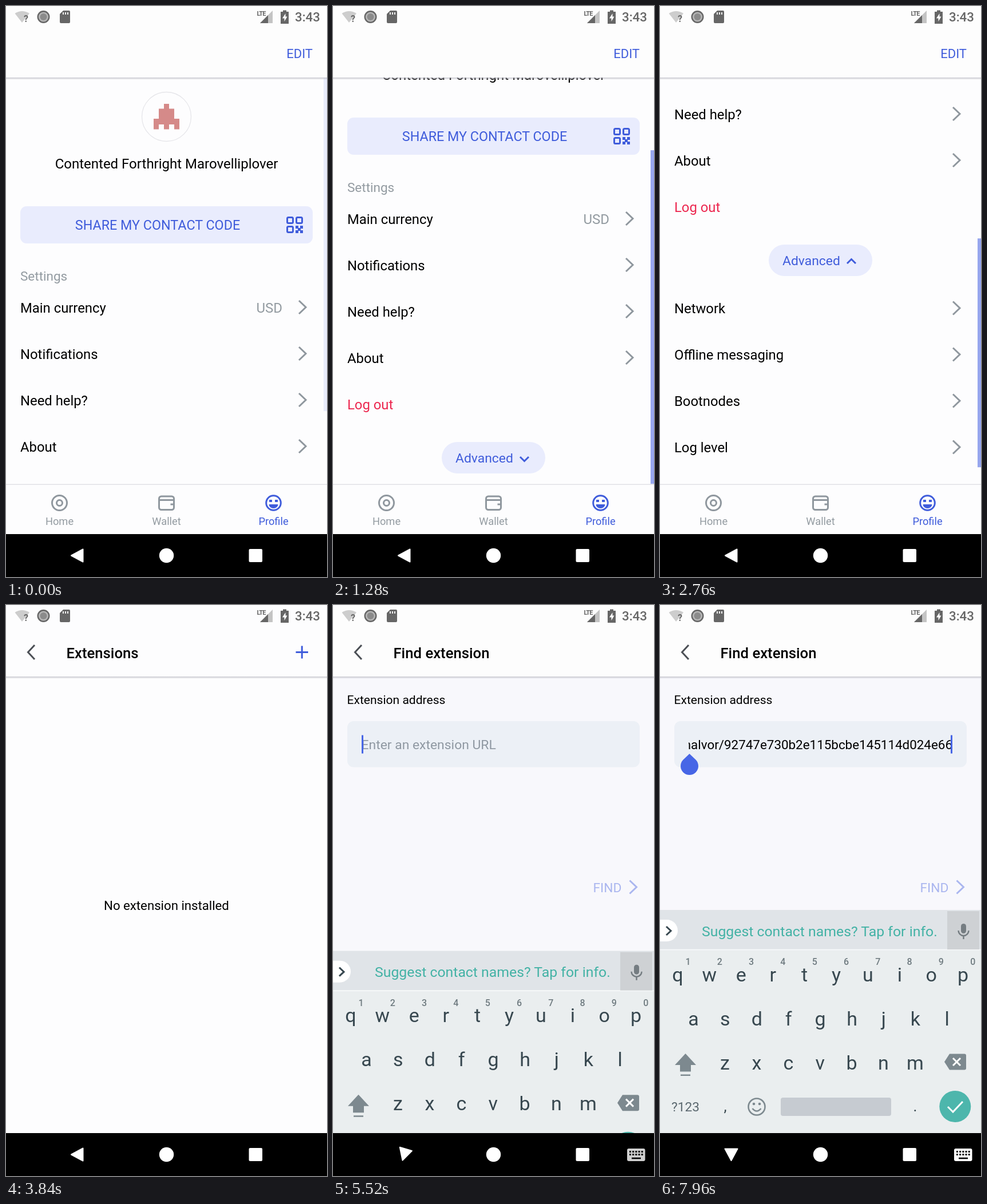
Recreate the animation shown at these times as an HTML page. Size 561 by 998 pixels, loop 8000 ms.

```html
<!DOCTYPE html>
<html lang="en">
<head>
<meta charset="utf-8">
<title>Installing an extension</title>
<style>
  html, body { margin: 0; width: 100%; height: 100%; overflow: hidden; background: #fdfdfe; }
  svg { display: block; width: 100%; height: 100%; font-family: Roboto, sans-serif; }
  .blue { fill: #3f5cdb; }
  .gray { fill: #939ba1; }
  .line { fill: none; stroke: #8f979e; stroke-width: 3; }
  .blueLine { fill: none; stroke: #3f5cdb; stroke-width: 3; }
  .mid { text-anchor: middle; }
  .row { font-size: 23.85px; }
  .title { font-size: 25.7px; font-weight: 500; }
  .tab { font-size: 18.3px; text-anchor: middle; }
  .key { font-size: 34px; text-anchor: middle; fill: #37474f; }
  .hint { font-size: 16px; font-weight: 500; text-anchor: middle; fill: #6f7b80; }
</style>
</head>
<body>
<svg viewBox="0 0 561 998">
  <defs>
    <linearGradient id="shade" x2="0" y2="1">
      <stop stop-color="#b9b9c2"/><stop offset="1" stop-color="#b9b9c2" stop-opacity="0"/>
    </linearGradient>
    <clipPath id="fieldClip"><path d="M50 204H512V283H50Z"/></clipPath>
    <path id="chevron" class="line" d="M512 -11.500L524 0L512 11.500"/>
    <path id="back" d="M50 70L38.500 82.500L50 95" fill="none" stroke="#4b4f55" stroke-width="3"/>
    <filter id="soft" x="-20%" y="-20%" width="140%" height="150%">
      <feDropShadow dx="0" dy="2" stdDeviation="2.500" flood-opacity=".3"/>
    </filter>
  </defs>
  <rect width="561" height="998" fill="#fdfdfe"/>

  <g id="profile">
    <g id="content">
      <circle cx="280.500" cy="193.500" r="43" fill="#fdfdfe" stroke="#e6e6ea" stroke-width="1.300"/>
      <path d="M276 171h9v8.500h9V197h9v18.500h-9V207h-9v8.500h-9V207h-9v8.500h-9V197h9V179.500h9Z" fill="#d58a89"/>
      <text x="280.500" y="284" class="mid" font-size="24">Contented Forthright Marovelliplover</text>
      <rect x="25" y="350" width="511" height="65" rx="11" fill="#e9ecfd"/>
      <text x="265" y="391" class="blue mid" font-size="23.300">SHARE MY CONTACT CODE</text>
      <g class="blueLine">
        <rect x="491.500" y="369.500" width="10" height="10" rx="2"/>
        <rect x="507.500" y="369.500" width="10" height="10" rx="2"/>
        <rect x="491.500" y="385.500" width="10" height="10" rx="2"/>
      </g>
      <path class="blue" d="M506 384h5v5h-5zM514 384h5v5h-5zM510 388h5v5h-5zM506 392h5v5h-5zM514 392h5v5h-5z"/>
      <text x="25" y="479.500" class="gray" font-size="22.500">Settings</text>
      <text x="483" y="535.500" class="gray" font-size="24" text-anchor="end">USD</text>
      <g id="rows"></g>
      <text x="25" y="860" class="row" fill="#ec2850">Log out</text>
      <rect x="190" y="917" width="181" height="55" rx="27.500" fill="#e9ecfd"/>
      <text x="214" y="953" class="blue" font-size="22.900">Advanced</text>
      <path id="fold" class="blueLine" d="M327 -3.500L334.500 4L342 -3.500"/>
      <g id="advanced"></g>
    </g>
    <rect id="bar" x="555" width="6" fill="#97a6ee"/>
    <rect y="836" width="561" height="87" fill="#fdfdfe"/>
    <rect y="835.500" width="561" height="1.500" fill="#e1e1e6"/>
    <g class="line">
      <circle cx="93.500" cy="868.500" r="13"/><circle cx="93.500" cy="868.500" r="5"/>
      <rect x="267.500" y="857" width="26" height="23.500" rx="4"/><path d="M268 863.500H294M294 871H287.500"/>
    </g>
    <circle class="blueLine" cx="467.500" cy="868.500" r="12.800"/>
    <path class="blue" d="M459.500 871h16a8 7 0 0 1-16 0ZM460 863h5v4h-5zM470 863h5v4h-5z"/>
    <text x="93.500" y="907" class="tab gray">Home</text>
    <text x="280.500" y="907" class="tab gray">Wallet</text>
    <text x="467.500" y="907" class="tab blue">Profile</text>
    <rect width="561" height="125" fill="#fdfdfd"/>
    <text x="536" y="91" class="blue" font-size="22" text-anchor="end">EDIT</text>
  </g>

  <g id="extensions">
    <rect width="561" height="923" fill="#fdfdfe"/>
    <use href="#back"/>
    <text x="105.500" y="92.500" class="title">Extensions</text>
    <path class="blueLine" d="M506.500 82.500H528M517.250 71.500V93.500"/>
    <text x="280.500" y="533" class="mid" font-size="22.200">No extension installed</text>
  </g>

  <g id="finder">
    <rect width="561" height="923" fill="#f8f8fc"/>
    <rect width="561" height="125" fill="#fdfdfd"/>
    <use href="#back"/>
    <text x="105.500" y="92.500" class="title">Find extension</text>
    <text x="24.500" y="173" font-size="21.050">Extension address</text>
    <rect x="25" y="203" width="511" height="80.500" rx="11" fill="#ecf0f6"/>
    <text id="placeholder" x="49.500" y="252" font-size="22.900" fill="#8f98a2">Enter an extension URL</text>
    <g clip-path="url(#fieldClip)">
      <text id="address" x="511" y="252" font-size="22.400" text-anchor="end">nalvor/92747e730b2e115bcbe145114d024e66</text>
    </g>
    <rect id="caret" y="227.500" width="3" height="32" fill="#4766e6"/>
    <path id="handle" d="M51.500 260L62.500 270.500A15.500 15.500 0 1 1 40.500 270.500Z" fill="#4766e6"/>
    <g id="find">
      <text x="454.500" y="890.500" font-size="22.800" fill="#aab6ef">FIND</text>
      <path d="M518.500 870L530.500 881.500L518.500 893" fill="none" stroke="#aab6ef" stroke-width="3"/>
    </g>
    <g id="popup" filter="url(#soft)">
      <rect x="27" y="143" width="176" height="65" rx="3" fill="#fff"/>
      <text x="49" y="182" font-size="19" font-weight="500" fill="#222">PASTE</text>
      <g fill="#666"><circle cx="171" cy="167" r="2.700"/><circle cx="171" cy="175.500" r="2.700"/><circle cx="171" cy="184" r="2.700"/></g>
    </g>
    <g id="keyboard">
      <rect y="533" width="561" height="400" fill="#eaeeef"/>
      <rect y="533" width="561" height="69" fill="#e0e4e8"/>
      <rect y="601.500" width="561" height="2" fill="#f6f8f9"/>
      <path d="M0 550H12a19 19 0 0 1 0 38H0Z" fill="#fff"/>
      <path d="M11 562L19 569.500L11 577" fill="none" stroke="#37474f" stroke-width="3"/>
      <text x="73" y="578.500" font-size="24.800" fill="#43b2a5">Suggest contact names? Tap for info.</text>
      <rect x="502" y="535" width="56" height="67" fill="#ced1d4"/>
      <rect x="526" y="557" width="9" height="17" rx="4.500" fill="#757d82"/>
      <path d="M521.500 569a9 9 0 0 0 18 0M530.500 578V584" fill="none" stroke="#757d82" stroke-width="2.500"/>
      <g id="keys"></g>
      <path d="M44.500 784L63 804H54V815.500H35V804H26ZM36 820.500H53V823H36Z" fill="#7d898f"/>
      <path d="M506 784.500H532a3 3 0 0 1 3 3V809.500a3 3 0 0 1-3 3H506L497 798.500Z" fill="#7d898f"/>
      <path d="M512 792L525 805M525 792L512 805" stroke="#fff" stroke-width="3"/>
      <text x="20" y="885" font-size="22.700" fill="#5b686f">?123</text>
      <text x="114" y="885" class="key" style="font-size:26px">,</text>
      <text x="446" y="885" class="key" style="font-size:26px">.</text>
      <circle cx="169" cy="877" r="14.500" fill="none" stroke="#7d898f" stroke-width="2.600"/>
      <path d="M161.500 880q7.500 9 15 0" fill="none" stroke="#7d898f" stroke-width="2.600"/>
      <circle cx="164" cy="872" r="2.300" fill="#7d898f"/><circle cx="174" cy="872" r="2.300" fill="#7d898f"/>
      <rect x="211" y="861" width="193" height="32" rx="4" fill="#c6cbd1"/>
      <circle cx="515.800" cy="876.500" r="27.500" fill="#4db6ac"/>
      <path d="M503 877L512 886L529 868" fill="none" stroke="#fff" stroke-width="3"/>
    </g>
  </g>

  <rect y="125" width="561" height="4" fill="url(#shade)" opacity=".8"/>

  <g id="status" fill="#666">
    <path d="M15.500 13Q28 5 41 13L28 29Z" fill="#cdcdcd"/>
    <text x="31" y="28" font-size="16" font-weight="700">?</text>
    <circle cx="65.500" cy="19" r="9.800" fill="#b5b5b5" stroke="#666" stroke-width="2.400"/>
    <circle cx="65.500" cy="19" r="6" fill="#8b8b8b"/>
    <path d="M100 8H110a2 2 0 0 1 2 2V28a2 2 0 0 1-2 2H96a2 2 0 0 1-2-2V14Z"/>
    <path d="M100 11v4M104 11v4M108 11v4" stroke="#fdfdfd" stroke-width="1.800"/>
    <path d="M466 8V30H444Z" fill="#c4c4c4"/><path d="M458 16V30H444Z"/>
    <text x="438.500" y="17" font-size="11" font-weight="700" textLength="auto" letter-spacing="-1">LTE</text>
    <path d="M484 7.500H490V10H494V31H480V10H484Z"/>
    <path d="M488.500 13L483 21.500H486.500V27L491.500 18.500H488.500Z" fill="#fdfdfd"/>
    <text x="505" y="27" font-size="22.300" font-weight="500">3:43</text>
  </g>

  <rect y="923" width="561" height="75"/>
  <g fill="#fff">
    <path id="navBack" d="M114 960.500L134.500 949.500V971.500Z" stroke="#fff" stroke-width="2" stroke-linejoin="round"/>
    <circle cx="280.500" cy="960.500" r="12.700"/>
    <rect x="424.500" y="949" width="23.500" height="23" rx="2"/>
    <g id="navKeys">
      <rect x="514" y="950" width="31.500" height="22" rx="3"/>
      <path d="M518 955.500H542M518 960.500H542" stroke="#000" stroke-width="3" stroke-dasharray="3 2.200"/>
      <path d="M522 967H538" stroke="#000" stroke-width="2.600"/>
    </g>
  </g>
</svg>
<script>
const LOOP = 8000, STEP = 40;
const VIEW_TOP = 125, VIEW_HEIGHT = 711;
const FOLDED_HEIGHT = 867, UNFOLDED_HEIGHT = 1264;
const el = Object.fromEntries([...document.querySelectorAll('svg [id]')].map(node => [node.id, node]));

// Linear interpolation through [time, value] points
function along(points, t) {
  if (t <= points[0][0]) return points[0][1];
  for (let i = 1; i < points.length; i++) {
    const [t0, v0] = points[i - 1], [t1, v1] = points[i];
    if (t <= t1) return v0 + (v1 - v0) * (t - t0) / (t1 - t0);
  }
  return points[points.length - 1][1];
}
const show = (node, visible) => node.setAttribute('visibility', visible ? 'visible' : 'hidden');
const fade = (node, alpha) => node.setAttribute('opacity', alpha);
const shift = (node, y) => node.setAttribute('transform', `translate(0 ${y})`);

const rowsFrom = (labels, firstY) => labels.map((label, i) => {
  const y = firstY + 81 * i;
  return `<text x="25" y="${y + 9}" class="row">${label}</text><use href="#chevron" y="${y}"/>`;
}).join('');
el.rows.innerHTML = rowsFrom(['Main currency', 'Notifications', 'Need help?', 'About'], 526.5);
el.advanced.innerHTML = rowsFrom(['Network', 'Offline messaging', 'Bootnodes', 'Log level', 'Extensions'], 1028);

const keyRow = (letters, x, y) => [...letters].map((letter, i) =>
  `<text x="${x + 55.4 * i}" y="${y}" class="key">${letter}</text>`).join('');
el.keys.innerHTML = keyRow('qwertyuiop', 31, 657.5) + keyRow('asdfghjkl', 58.5, 734.5) + keyRow('zxcvbnm', 113.5, 811.5) +
  [...'1234567890'].map((digit, i) => `<text x="${49 + 55.3 * i}" y="629" class="hint">${digit}</text>`).join('');

const scrollPath = [[840, 0], [880, 8], [920, 24], [960, 43.6], [1040, 112], [1120, 155],
  [2480, 155], [2560, 215], [2680, 400], [2760, 500], [2840, 553]];
const barAlpha = [[0, 0.2], [80, 0], [840, 0], [880, 1], [1440, 1], [1720, 0],
  [2320, 0], [2360, 1], [3200, 1], [3480, 0]];

function drawProfile(t) {
  const offset = along(scrollPath, t);
  const height = t < 2520 ? FOLDED_HEIGHT : UNFOLDED_HEIGHT;
  shift(el.content, -offset);
  el.bar.setAttribute('y', VIEW_TOP + offset * VIEW_HEIGHT / height);
  el.bar.setAttribute('height', VIEW_HEIGHT * VIEW_HEIGHT / height);
  fade(el.bar, along(barAlpha, t));
  const unfolded = t >= 2360;
  el.fold.setAttribute('transform', `translate(0 946.5) scale(1 ${unfolded ? -1 : 1})`);
  fade(el.advanced, unfolded ? 1 : 0);
}

function drawFinder(t) {
  const rise = 1 - (1 - along([[5360, 0], [5640, 1]], t)) ** 2;
  const pasted = t >= 7920;
  shift(el.keyboard, 390 * (1 - rise));
  fade(el.keyboard, Math.min(1, rise * 1.5));
  shift(el.find, t >= 5480 ? -388.5 : 0);
  fade(el.placeholder, t >= 5400 && !pasted ? 1 : 0);
  fade(el.address, pasted ? 1 : 0);
  fade(el.caret, (t >= 5480 && t < 6320) || t >= 6880 ? 1 : 0);
  el.caret.setAttribute('x', pasted ? 508 : 50);
  fade(el.handle, t >= 6880 ? 1 : 0);
  fade(el.popup, along([[6840, 0], [7240, 1], [7880, 1], [7960, 0]], t));
  el.navBack.setAttribute('transform', `rotate(${-90 * rise} 124.5 960.5)`);
  fade(el.navKeys, rise);
}

function draw(now) {
  const t = Math.floor(now % LOOP / STEP) * STEP;
  show(el.profile, t < 3840);
  show(el.extensions, t >= 3760 && t < 5360);
  fade(el.extensions, along([[3720, 0], [3840, 1]], t));
  show(el.finder, t >= 5360);
  drawProfile(t);
  drawFinder(t);
}

const start = performance.now();
function tick() {
  draw(performance.now() - start);
  requestAnimationFrame(tick);
}
tick();
</script>
</body>
</html>
```
